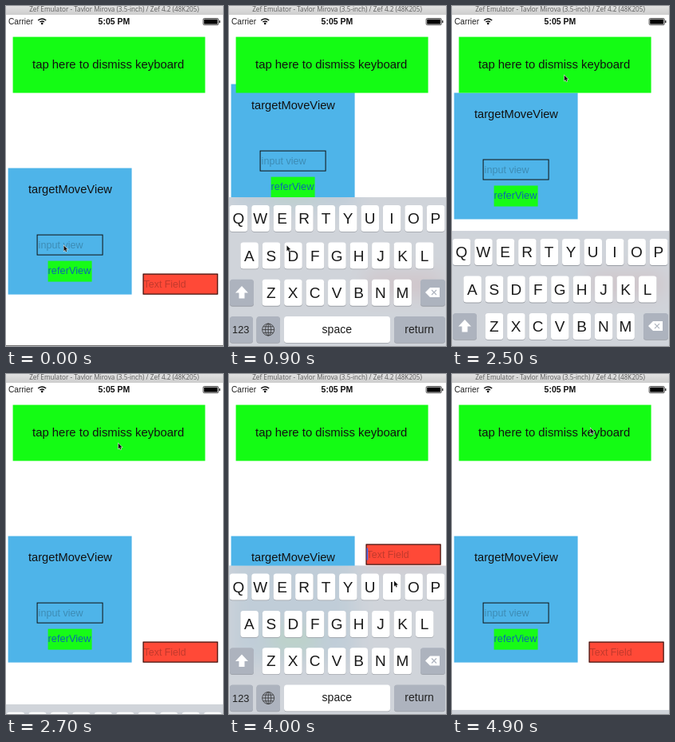
Recreate the animation shown at these times as an HTML page with a canvas. Size 272 px wide and 425 px high, loop 5000 ms.

```html
<!DOCTYPE html>
<html lang="en">
<head>
<meta charset="utf-8">
<title>Keyboard avoidance</title>
<style>
html, body { margin: 0; width: 100%; height: 100%; overflow: hidden; background: #fff; }
canvas { display: block; width: 272px; height: 425px; }
</style>
</head>
<body>
<canvas id="stage"></canvas>
<script>
const W = 272, H = 425, LOOP = 5000;
const SANS = '"Liberation Sans", Arial, sans-serif';
const KEY_TOP = 239, KEY_TRAVEL = 185;
const canvas = document.getElementById('stage');
const c = canvas.getContext('2d');
const dpr = window.devicePixelRatio || 1;
canvas.width = W * dpr;
canvas.height = H * dpr;

// Keyboard sessions: when each field gains and loses focus.
const inputFocus = { on: 300, off: 2450 };
const textFocus = { on: 3550, off: 4583 };

// Pointer stops: time, x, y.
const path = [
  [0, 72.5, 299.5], [1300, 72.5, 299.5], [1850, 142.6, 131.8], [2000, 142.6, 131.8],
  [2350, 140.8, 86.8], [2800, 140.8, 86.8], [3400, 228.5, 346.8], [3720, 228.5, 346.8],
  [4000, 207, 258.8], [4480, 173.5, 67.8], [5000, 173.5, 67.8]
];

const clamp = v => Math.min(1, Math.max(0, v));
const ease = v => v * v * (3 - 2 * v);

function spring(ms) {
  const k = Math.max(0, ms) * 0.018;
  return 1 - (1 + k) * Math.exp(-k);
}

const slide = (t, f) => ease(clamp((t - f.on) / 250)) - ease(clamp((t - f.off) / 250));
const lift = (t, f) => t < f.off ? spring(t - f.on) : 1 - spring(t - f.off);

function rect(x, y, w, h, fill) {
  c.fillStyle = fill;
  c.fillRect(x, y, w, h);
}

function frame(x, y, w, h) {
  c.strokeStyle = '#111';
  c.lineWidth = 1;
  c.strokeRect(x + 0.5, y + 0.5, w - 1, h - 1);
}

function text(s, x, y, size, color = '#111', align = 'left', weight = '', family = SANS) {
  c.font = `${weight} ${size}px ${family}`;
  c.textAlign = align;
  c.fillStyle = color;
  c.fillText(s, x, y);
}

function shape(points, fill, stroke, width = 1) {
  c.beginPath();
  points.forEach(([x, y]) => c.lineTo(x, y));
  c.closePath();
  if (stroke) {
    c.strokeStyle = stroke;
    c.lineWidth = width;
    c.stroke();
  }
  if (fill) {
    c.fillStyle = fill;
    c.fill();
  }
}

function caret(x, y, t, f) {
  if (t >= f.on && t < f.off && (t - f.on) % 1000 < 500) rect(x, y, 1.6, 15, '#426bf2');
}

function key(x, y, w, color = '#fff') {
  c.fillStyle = '#9a9ea5';
  c.beginPath();
  c.roundRect(x, y + 0.8, w, 33, 3.5);
  c.fill();
  c.fillStyle = color;
  c.beginPath();
  c.roundRect(x, y, w, 33, 3.5);
  c.fill();
}

function letters(row, first, y) {
  [...row].forEach((ch, i) => {
    const x = first + i * 27.45;
    key(x - 11, y, 22.5);
    text(ch, x, y + 23, 19, '#1a1a1a', 'center');
  });
}

function globe(x, y) {
  c.strokeStyle = '#333';
  c.lineWidth = 0.8;
  c.beginPath();
  c.arc(x, y, 7.5, 0, 7);
  c.moveTo(x + 3.6, y);
  c.ellipse(x, y, 3.6, 7.5, 0, 0, 7);
  c.moveTo(x, y - 7.5);
  c.lineTo(x, y + 7.5);
  for (const [dy, r] of [[-3.8, 6.4], [0, 7.5], [3.8, 6.4]]) {
    c.moveTo(x - r, y + dy);
    c.lineTo(x + r, y + dy);
  }
  c.stroke();
}

// Frosted panel: blurred views seen through a grey veil.
function frosted(y, blueY, redY) {
  c.save();
  c.beginPath();
  c.rect(0, y, W, H - y);
  c.clip();
  rect(0, y, W, H - y, '#fff');
  c.filter = 'blur(12px)';
  rect(3, blueY, 155, 158, '#4eb4e9');
  rect(53, blueY + 116, 55, 26, '#17fb17');
  rect(172, redY, 94, 26, '#ff4937');
  c.filter = 'none';
  rect(0, y, W, H - y, 'rgba(204, 208, 215, 0.91)');
  c.restore();
}

function keyboard(y) {
  const dark = '#adb3be';
  c.save();
  c.translate(0, y);
  letters('QWERTYUIOP', 11.8, 10);
  letters('ASDFGHJKL', 25.4, 56.5);
  letters('ZXCVBNM', 52.7, 102.8);

  key(1, 102.8, 30, dark);
  shape([[16, 111], [24, 119.5], [19.5, 119.5], [19.5, 126.5], [12.5, 126.5], [12.5, 119.5], [8, 119.5]], '#fff');

  key(240, 102.8, 31, dark);
  shape([[246, 119], [252, 113], [264, 113], [264, 125], [252, 125]], '#fff');
  c.strokeStyle = dark;
  c.lineWidth = 1.2;
  c.beginPath();
  c.moveTo(254, 116);
  c.lineTo(260, 122);
  c.moveTo(260, 116);
  c.lineTo(254, 122);
  c.stroke();

  key(1, 149, 29, dark);
  text('123', 14.8, 170.3, 12.8, '#222', 'center');
  key(34.5, 149, 29.5, dark);
  globe(49.2, 165.5);
  key(69, 149, 133);
  text('space', 135.3, 169.7, 14, '#1a1a1a', 'center');
  key(207, 149, 64, dark);
  text('return', 238.6, 169.7, 14, '#222', 'center');
  c.restore();
}

function blueView(y, t) {
  rect(3, y, 155, 158, '#4eb4e9');
  text('targetMoveView', 28.3, y + 31, 14.7);
  text('input view', 41, y + 100, 12.6, '#3d8cb5');
  frame(39, y + 83, 83, 26);
  caret(41, y + 88, t, inputFocus);
  rect(53, y + 116, 55, 26, '#17fb17');
  text('referView', 53, y + 132.5, 12.8, '#0c66b0');
}

function redField(y, t) {
  rect(172, y, 94, 26, '#ff4937');
  text('Text Field', 173, y + 17, 12.4, '#c23a2d');
  frame(172, y, 94, 26);
  caret(173, y + 5, t, textFocus);
}

function statusBar() {
  const g = c.createLinearGradient(0, 0, 0, 11);
  g.addColorStop(0, '#e2e2e2');
  g.addColorStop(1, '#cdcdcd');
  rect(0, 0, W, 11, g);
  text('Zef Emulator - Tavlor Mirova (3.5-inch) / Zef 4.2 (48K205)', 135.5, 7.4, 8.2,
    '#5c5c5c', 'center', '', '"Open Sans", sans-serif');

  text('Carrier', 3, 23.2, 10.2, '#222');
  text('5:05 PM', 135.4, 23, 10.5, '#111', 'center', 'bold');

  c.strokeStyle = '#111';
  c.lineWidth = 1.5;
  for (const r of [3.8, 6.8]) {
    c.beginPath();
    c.arc(45.2, 22.7, r, -Math.PI * 0.76, -Math.PI * 0.24);
    c.stroke();
  }
  c.fillStyle = '#111';
  c.beginPath();
  c.arc(45.2, 21.9, 1.3, 0, 7);
  c.fill();

  c.lineWidth = 0.7;
  c.beginPath();
  c.roundRect(247.1, 15.5, 19.2, 8.2, 1.5);
  c.stroke();
  rect(248.2, 16.6, 17, 6, '#000');
  rect(267.2, 18.1, 1.2, 3, '#111');
}

function pointer(t) {
  const i = path.findIndex(p => p[0] > t);
  const [t0, x0, y0] = path[i - 1], [t1, x1, y1] = path[i];
  const k = ease((t - t0) / (t1 - t0));
  c.save();
  c.translate(x0 + (x1 - x0) * k, y0 + (y1 - y0) * k);
  c.scale(0.85, 0.85);
  shape([[0, 0], [0, 7.8], [1.8, 6.2], [3, 9], [4.3, 8.4], [3.1, 5.7], [5.6, 5.5]], '#111', '#e8e8e8', 1.2);
  c.restore();
}

function draw(t) {
  const blueY = 203 - 105 * slide(t, inputFocus);
  const redY = 335 - 122 * slide(t, textFocus);
  const up = t < 3300 ? lift(t, inputFocus) : lift(t, textFocus);

  c.setTransform(dpr, 0, 0, dpr, 0, 0);
  rect(0, 0, W, H, '#fff');

  // The recorded views sit slightly off the pixel grid.
  c.save();
  c.translate(-0.4, -0.4);
  blueView(blueY, t);
  redField(redY, t);
  rect(9, 39, 241, 70, '#14fc14');
  text('tap here to dismiss keyboard', 33.4, 78.2, 14.9);
  c.restore();

  rect(0, 424, W, 1, '#777');
  if (up > 0.004) {
    const y = KEY_TOP + KEY_TRAVEL * (1 - up);
    frosted(y, blueY, redY);
    keyboard(y);
  }
  statusBar();
  pointer(t);
}

let start;
function tick(now) {
  start ??= now;
  draw(Math.max(0, now - start) % LOOP);
  requestAnimationFrame(tick);
}
draw(0);
requestAnimationFrame(tick);
</script>
</body>
</html>
```
